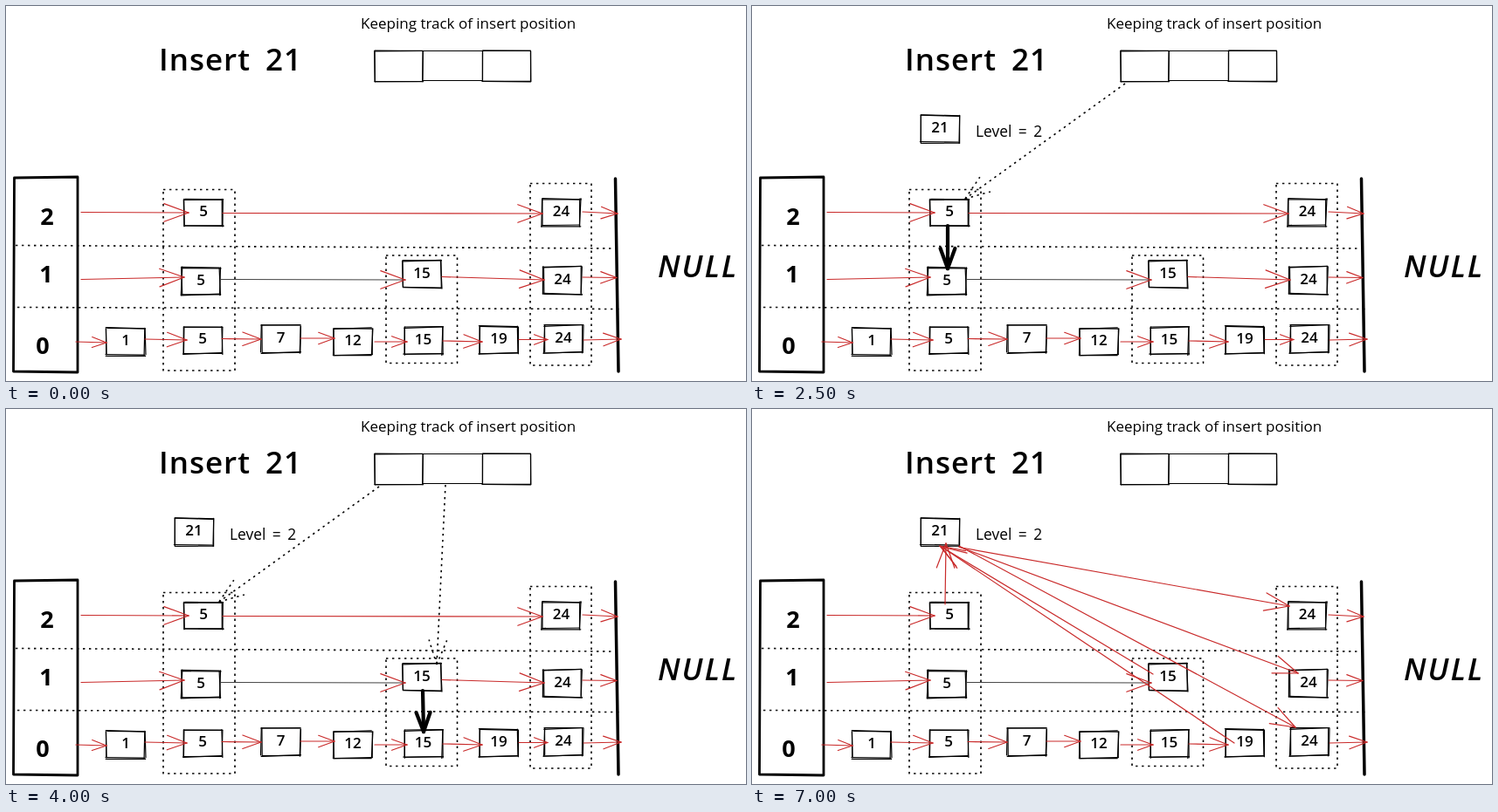
Recreate the animation shown at these times as an HTML page. Size 847 by 430 pixels, loop 9000 ms.

```html
<!DOCTYPE html>
<html lang="en">
<head>
<meta charset="utf-8">
<title>Skip list insert</title>
<style>
  html, body { margin: 0; width: 100%; height: 100%; overflow: hidden; background: #fff; }
  svg { display: block; width: 847px; height: 430px; }
  path { fill: none; stroke: #000; stroke-width: 1.2; stroke-linecap: round; stroke-linejoin: round; }
  .red { stroke: #c92a2a; }
  .dark { stroke: #444; }
  .bold { stroke-width: 4.2; }
  .dots { stroke-width: 1.6; stroke-dasharray: 2.4 4.6; stroke-linecap: butt; }
  text { font: 500 17px "Open Sans", sans-serif; fill: #000; }
  .mid { text-anchor: middle; font-weight: 600; }
  .level { font-size: 27px; font-weight: 700; }
  .title { font-size: 35px; font-weight: 600; letter-spacing: 1px; word-spacing: 7px; }
  .null { font-size: 35px; font-style: italic; letter-spacing: 2px; }
  .note { font-size: 17.4px; }
  .spaced { word-spacing: 3px; }
</style>
</head>
<body>
<svg viewBox="0 0 847 430"></svg>
<script>
const svg = document.querySelector('svg');
const sheet = document.head.appendChild(document.createElement('style'));
const STEPS = 18;      // half-second steps in the nine-second loop
const END = STEPS;
let layer = svg;
let seed = 7;

function jitter(amount) {
  seed = (seed * 16807) % 2147483647;
  return (seed / 2147483647 * 2 - 1) * amount;
}

function add(tag, attrs, parent = layer) {
  const el = document.createElementNS('http://www.w3.org/2000/svg', tag);
  for (const key in attrs) el.setAttribute(key, attrs[key]);
  return parent.appendChild(el);
}

const path = (d, cls = '') => add('path', { d, class: cls });

function label(str, x, y, cls = '') {
  add('text', { x, y, class: cls }).textContent = str;
}

// Everything drawn by draw() is visible from step a up to step b.
function during(a, b, draw) {
  const name = `show-${a}-${b}`;
  const pct = n => (n / STEPS * 100).toFixed(4) + '%';
  const frames = [];
  if (a > 0) frames.push('0% { visibility: hidden }');
  frames.push(`${pct(a)} { visibility: visible }`);
  frames.push(b < END ? `${pct(b)}, 100% { visibility: hidden }` : '100% { visibility: visible }');
  sheet.textContent += `@keyframes ${name} { ${frames.join(' ')} }\n`;
  layer = add('g', { style: `animation: ${name} 9s step-end infinite` }, svg);
  draw();
  layer = svg;
}

function arrow(x1, y1, x2, y2, cls = 'red', headCls = cls) {
  const length = Math.hypot(x2 - x1, y2 - y1);
  const size = Math.min(30, length / 2);
  const back = Math.atan2(y1 - y2, x1 - x2);
  path(`M${x1} ${y1}L${x2} ${y2}`, cls);
  for (const turn of [-0.35, 0.35]) {
    const x = x2 + size * Math.cos(back + turn);
    const y = y2 + size * Math.sin(back + turn);
    path(`M${x2} ${y2}L${x.toFixed(1)} ${y.toFixed(1)}`, headCls);
  }
}

// A box sketched with two slightly uneven passes, each side drawn on its own.
function sketchBox(x, y, w, h, cls = '', rough = 1) {
  const p = (px, py) => `${(px + jitter(rough)).toFixed(1)} ${(py + jitter(rough)).toFixed(1)}`;
  const corners = [[x, y], [x + w, y], [x + w, y + h], [x, y + h]];
  for (let side = 0; side < 8; side++) {
    path(`M${p(...corners[side % 4])}L${p(...corners[(side + 1) % 4])}`, cls);
  }
}

function node(value, x, y) {
  sketchBox(x, y, 44, 31);
  label(value, x + 22, y + 19.5, 'mid');
}

const boldBox = (x, y) => sketchBox(x, y, 45, 31, 'bold', 0.7);
const ask = (x, y) => label('Less than 21?', x, y, 'note');
const dottedBox = (x, y, r, b) => path(`M${x} ${y}H${r}V${b}H${x}Z`, 'dots');

// Headings and the position tracker
label('Insert 21', 175, 74, 'title');
label('Keeping track of insert position', 406, 26);
label('NULL', 746, 311, 'title null');
path('M477 51.5H545M477 85.5H545');
for (const x of [422, 545.5]) sketchBox(x, 51.5, 55, 35, '', 0.4);

// Level column, rows, groups and the end bar
path('M9.5 197L82 196L82 420L8.5 419Z').style.strokeWidth = 2.8;
path('M697.5 198L701 419').style.strokeWidth = 3.5;
label('2', 47, 251, 'mid level');
label('1', 46, 317, 'mid level');
label('0', 42, 399, 'mid level');
path('M11 274.5L704 278', 'dots');
path('M13 345.5L704 347.5', 'dots');
dottedBox(180, 210.5, 262, 418);
dottedBox(435, 286, 516.5, 409.5);
dottedBox(600, 203.5, 670, 412);

// Nodes
node(5, 204, 221.5);
node(24, 613.5, 221);
node(5, 201, 300);
node(15, 454, 292);
node(24, 615, 299);
node(1, 115, 369.5);
node(5, 203, 367.5);
node(7, 292.5, 366.5);
node(12, 375, 369.5);
node(15, 455.5, 368.5);
node(19, 542, 367.5);
node(24, 616, 366.5);

// Links that never change
arrow(86, 236.5, 209, 237);
arrow(660, 236, 700, 238);
arrow(86, 313.5, 204, 311);
arrow(246, 313.5, 457, 314, 'dark', 'red');
arrow(660, 311, 699, 311.5);
arrow(80, 385, 115, 386);
arrow(159, 382, 207, 383);
arrow(247, 381.5, 292, 382);
arrow(337, 381, 376, 381);
arrow(422, 385, 459, 385);
arrow(500, 384, 545, 385);
arrow(661, 383, 704, 382);

// Links replaced by the insertion
during(0, 12, () => arrow(248, 237.5, 614, 238));
during(0, 13, () => arrow(499, 310.5, 616, 314));
during(0, 14, () => arrow(587, 382.5, 620, 382.5));

// The new node
during(1, END, () => node(21, 193, 125.5));
during(2, END, () => label('Level = 2', 256, 150, 'note spaced'));

// Search on level 2
during(3, 4, () => {
  arrow(86, 238, 208, 238, 'bold');
  boldBox(204, 221.5);
  ask(92, 206);
});
during(4, 5, () => {
  arrow(248, 241, 614, 239, 'bold');
  ask(320, 214);
});
during(5, 6, () => arrow(224, 252, 224, 301, 'bold'));

// Search on level 1
during(6, 7, () => {
  arrow(246, 312.5, 460, 315, 'bold');
  boldBox(454, 292);
  ask(290, 306);
});
during(7, 8, () => {
  arrow(499, 311, 616, 315, 'bold');
  ask(503, 303);
});
during(8, 9, () => arrow(477, 323, 478, 370, 'bold'));

// Search on level 0
during(9, 10, () => {
  arrow(500, 384, 545, 386, 'bold');
  boldBox(542, 368);
});
during(10, 11, () => {
  arrow(587, 383, 619, 385, 'bold');
  boldBox(616, 367);
});

// Remembered positions
during(5, 12, () => arrow(427, 89, 244, 221, 'dots'));
during(8, 13, () => arrow(503, 87, 493, 293, 'dots'));
during(10, 14, () => arrow(579, 87, 566, 364, 'dots'));

// Links through the new node
during(12, END, () => {
  arrow(221, 224, 222, 154);
  arrow(237, 158.5, 615, 226);
});
during(13, END, () => {
  arrow(459, 304, 215, 157);
  arrow(237, 158, 625, 303);
});
during(14, END, () => {
  arrow(552, 383, 217, 158);
  arrow(237, 157, 622, 365);
});
</script>
</body>
</html>
```
